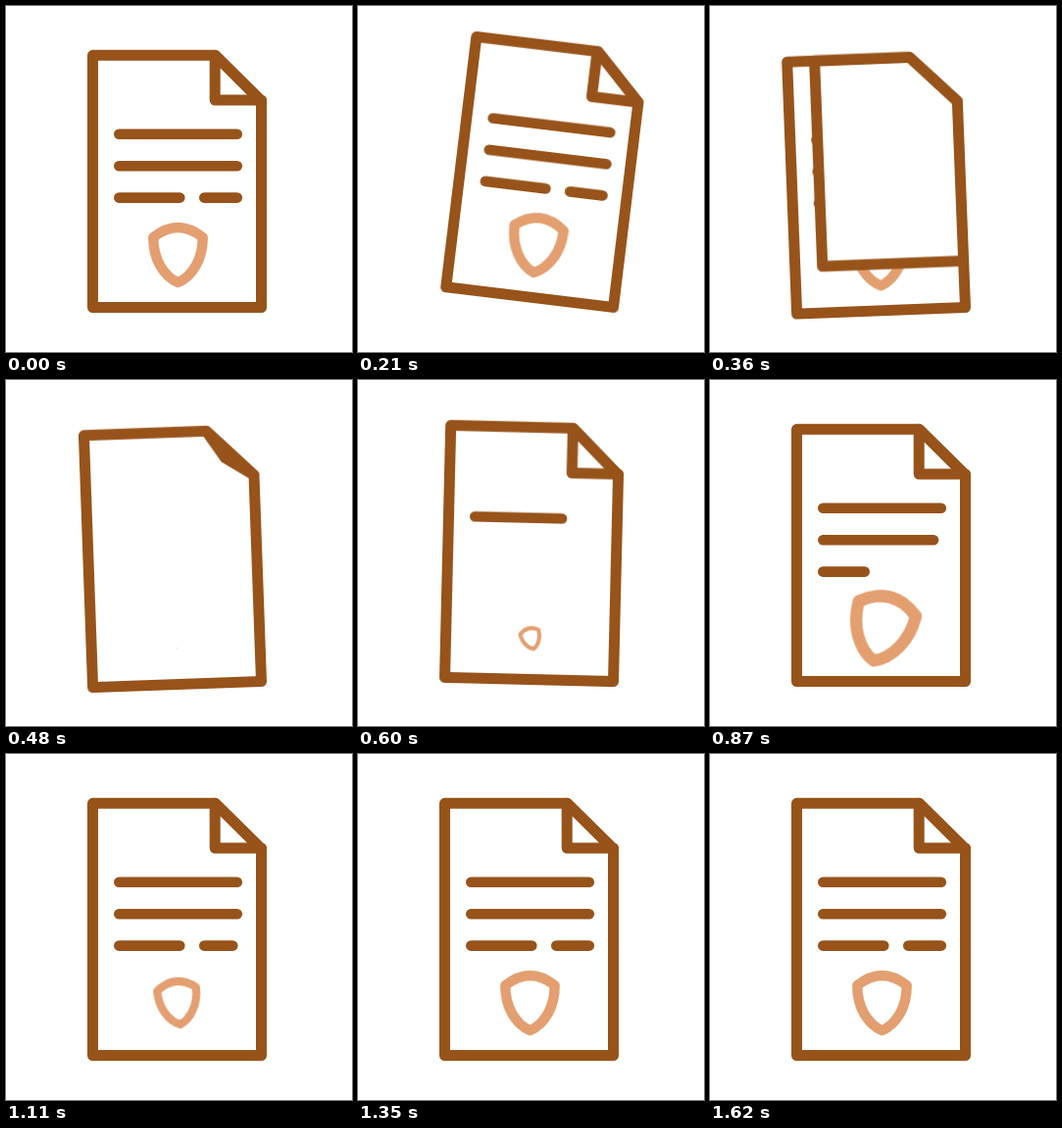
An HTML page that plays this animation: 353 by 353 pixels, repeating every 1710 ms.

```html
<!DOCTYPE html>
<html lang="en">
<head>
<meta charset="utf-8">
<title>Document page turn</title>
<style>
  html, body { margin: 0; width: 100%; height: 100%; overflow: hidden; background: #fff; }
  svg { display: block; width: 100vw; height: 100vh; }
  path { fill: none; stroke: #97531a; stroke-width: 11; stroke-linecap: round; stroke-linejoin: round; }

  .page, .content, .seal, .flap, .line { animation: 1710ms ease-in-out infinite; }
  .page { animation-name: sway; transform-origin: 260.5px 307.5px; }
  .content { animation-name: rise; }
  .seal { animation-name: pop; transform-origin: 175.5px 254px; stroke: #e49f70; stroke-width: 10.4; }
  .flap { animation-name: turn; fill: #fff; }
  .line { stroke-width: 10.6; stroke-dasharray: 1 3; }
  .l1 { animation-name: write1; }
  .l2 { animation-name: write2; }
  .l3 { animation-name: write3; }
  .l4 { animation-name: write4; }

  @keyframes sway {
    0% { transform: rotate(0deg); }
    11.7% { transform: rotate(7deg); }
    23.4% { transform: rotate(-3deg); }
    39% { transform: rotate(2deg); }
    46.8% { transform: rotate(-.25deg); }
    50.7%, 100% { transform: rotate(0deg); }
  }

  /* the flap sweeps over the sheet, then a fresh corner folds in */
  @keyframes turn {
    0%, 11.7% { d: path("M213.5 50.3L213.2 50.3L213.2 96L260.5 96L260.5 97Z"); }
    25.7% { d: path("M213.5 50.3L88.5 50.3L88.5 307.5L260.5 307.5L260.5 97Z"); }
    25.71% { d: path("M213.5 50.3L213.5 50.3L237 73.5L260.5 97L260.5 97Z"); }
    33.2%, 100% { d: path("M213.5 50.3L213.2 50.3L213.2 96L260.5 96L260.5 97Z"); }
  }

  @keyframes rise {
    0%, 25.7% { transform: translateY(0); }
    25.71% { transform: translateY(17px); }
    50.7%, 100% { transform: translateY(0); }
  }

  @keyframes pop {
    0%, 25.7% { transform: rotate(0deg) scale(1); }
    25.71% { transform: rotate(-30deg) scale(0); }
    49.7% { transform: rotate(15deg) scale(1.2); }
    64.3% { transform: rotate(-6deg) scale(.79); }
    79.9%, 100% { transform: rotate(0deg) scale(1); }
  }

  @keyframes write1 {
    0%, 25.7% { stroke-dashoffset: 0; }
    25.71%, 28.4% { stroke-dashoffset: 1.5; }
    28.41% { stroke-dashoffset: 1; animation-timing-function: cubic-bezier(.25, .46, .45, .94); }
    42.9%, 100% { stroke-dashoffset: 0; }
  }
  @keyframes write2 {
    0%, 25.7% { stroke-dashoffset: 0; }
    25.71%, 37% { stroke-dashoffset: 1.5; }
    37.01% { stroke-dashoffset: 1; animation-timing-function: cubic-bezier(.25, .46, .45, .94); }
    55.6%, 100% { stroke-dashoffset: 0; }
  }
  @keyframes write3 {
    0%, 25.7% { stroke-dashoffset: 0; }
    25.71%, 43.9% { stroke-dashoffset: 1.5; }
    43.91% { stroke-dashoffset: 1; animation-timing-function: cubic-bezier(.25, .46, .45, .94); }
    60.8%, 100% { stroke-dashoffset: 0; }
  }
  @keyframes write4 {
    0%, 25.7% { stroke-dashoffset: 0; }
    25.71%, 56.5% { stroke-dashoffset: 1.5; }
    56.51% { stroke-dashoffset: 1; animation-timing-function: cubic-bezier(.25, .46, .45, .94); }
    70.2%, 100% { stroke-dashoffset: 0; }
  }
</style>
</head>
<body>
<svg viewBox="0 0 353 353">
  <g class="page">
    <g class="content">
      <path class="line l1" pathLength="1" d="M115.3 130.8H235.8"/>
      <path class="line l2" pathLength="1" d="M115.3 163.2H235.8"/>
      <path class="line l3" pathLength="1" d="M115.3 195.6H177.3"/>
      <path class="line l4" pathLength="1" d="M202.3 195.6H235.8"/>
      <path class="seal" d="M150.3 236Q175.5 216 200.7 236C201 258 190 276 175.5 282C161 276 150 258 150.3 236Z"/>
    </g>
    <path class="flap" d="M213.5 50.3L213.2 50.3L213.2 96L260.5 96L260.5 97Z"/>
    <path d="M88.5 50.3H213.5L260.5 97V307.5H88.5Z"/>
  </g>
</svg>
</body>
</html>
```
